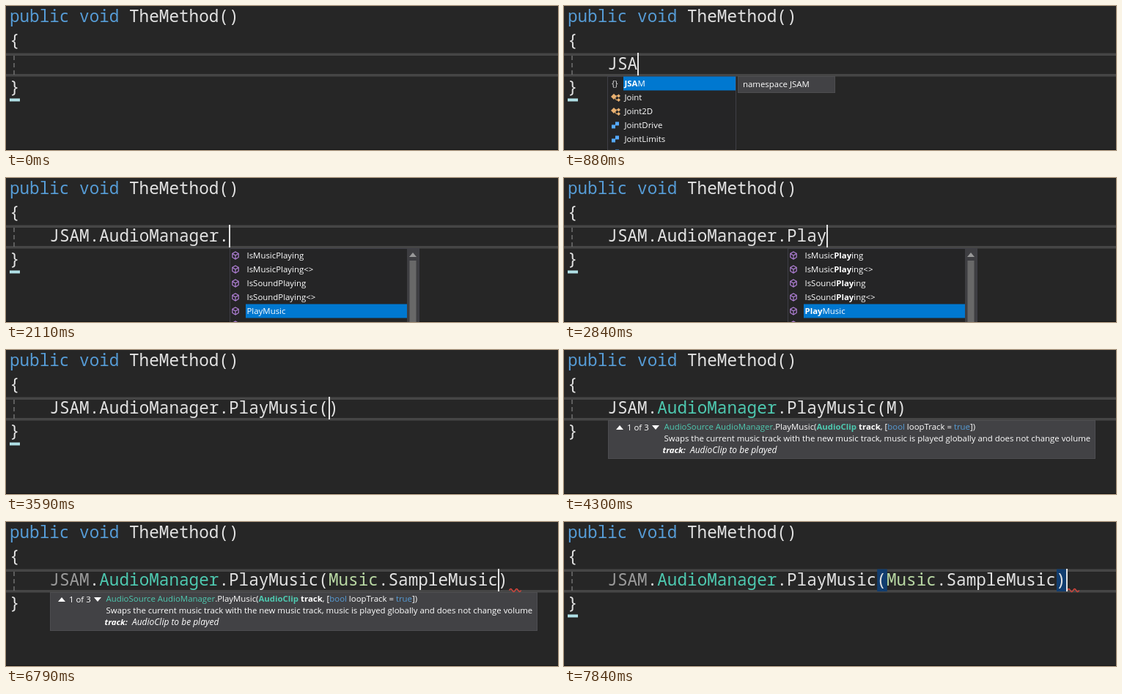
These frames come from a looping animation (753x197 px, 8000 ms). An HTML page:

```html
<!DOCTYPE html>
<html lang="en">
<head>
<meta charset="utf-8">
<title>Code completion</title>
<style>
html, body { margin: 0; width: 100%; height: 100%; overflow: hidden; background: #262626; }
svg { display: block; }
text { white-space: pre; }
.code { font: 500 22.67px "Noto Sans Mono", monospace; }
.ui { font: 11.42px "Open Sans", sans-serif; }
.b { font-weight: 700; }
.i { font-style: italic; }
.wide { font-size: 12px; }
</style>
</head>
<body>
<svg id="stage" width="753" height="197" viewBox="0 0 753 197"></svg>
<script>
const LOOP = 8000, CELL = 13.6, LEFT = 60;
const INK = '#e2e2e2', TEAL = '#4ec9b0', BLUE = '#569cd6', UI = '#ffffff';
const stage = document.getElementById('stage');

const col = n => LEFT + n * CELL;
const esc = s => s.replace(/</g, '&lt;').replace(/>/g, '&gt;');
const rect = (x, y, w, h, fill, more = '') =>
  `<rect x="${x}" y="${y}" width="${w}" height="${h}" fill="${fill}" ${more}/>`;
const path = (d, fill, more = '') => `<path d="${d}" fill="${fill}" ${more}/>`;
const span = (s, fill, cls = '') => `<tspan fill="${fill}" class="${cls}">${esc(s)}</tspan>`;
const text = (x, y, cls, body) => `<text x="${x}" y="${y}" class="${cls}" fill="${INK}">${body}</text>`;
const within = (t, a, b) => t >= a && t < b;

// Typed text: each entry holds from its time on
const typing = [[0, '']];
function type(base, extra, times) {
  times.forEach((at, i) => typing.push([at, base + extra.slice(0, i + 1)]));
}
const CALL = 'JSAM.AudioManager.';
type('', 'JSAM.Audio', [640, 760, 860, 960, 1100, 1240, 1340, 1410, 1470, 1580]);
typing.push([1740, 'JSAM.AudioManager'], [2000, CALL]);
type(CALL, 'PlayMusic(', [2380, 2500, 2690, 2840, 2990, 3210, 3270, 3330, 3390, 3550]);
type(CALL + 'PlayMusic(', 'Music.', [4300, 4510, 4610, 4720, 4840, 5020]);
const ARG = CALL + 'PlayMusic(Music.';
typing.push([5710, ARG + 'S'], [5860, ARG + 'SampleMusic'], [7680, ARG + 'SampleMusic)']);

const typedAt = t => typing.filter(e => e[0] <= t).pop()[1];

// The caret flips at each of these times, starting hidden
const flips = [400, 1240, 1320, 2990, 3550, 4140, 4450, 6270, 6760, 7280, 7680];
const caretOn = t => flips.filter(f => f <= t).length % 2 === 1;

// Completion lists: kind and label of each row
const lists = [
  { from: 660, to: 1100, x: 59, y: 96, w: 176, sel: 0, col: 0, note: 'namespace JSAM', noteEnd: 370,
    rows: ['n JSAM', 'c Joint', 'c Joint2D', 's JointDrive', 's JointLimits', 's JointMotor'] },
  { from: 1160, to: 1740, x: 127, y: 96, w: 204, sel: 4, col: 5, thumb: [136, 34],
    rows: ['c AudioFileMusicObject', 'c AudioFileObject', 's AudioHighPassObj', 's AudioLowPassObj',
      'c AudioManager', 'c AudioPlaylist'] },
  { from: 2080, to: 3060, x: 305, y: 96, w: 259, sel: 4, col: 18, thumb: [113, 90],
    rows: ['m IsMusicPlaying', 'm IsMusicPlaying<>', 'm IsSoundPlaying', 'm IsSoundPlaying<>',
      'm PlayMusic', 'm PlayMusic<>'] },
  { from: 3060, to: 3550, x: 305, y: 96, w: 259, sel: 0, col: 18, tray: 18,
    rows: ['m PlayMusic', 'm PlayMusic<>', 'm PlayMusicObject', 'm PlayMusicObject<>'] },
  { from: 4450, to: 5020, x: 439, y: 149, w: 170, sel: 0, col: 28, note: 'enum JSAM.Music', noteEnd: 760,
    rows: ['e Music', 'c MusicObject', 'c MusicPlayer'] },
  { from: 5150, to: 5860, x: 521, y: 149, w: 130, sel: 0, col: 34, rows: ['v SampleMusic'] }
];

function icon(kind, x, y) {
  const at = body => `<g transform="translate(${x} ${y})">${body}</g>`;
  if (kind === 'c') return at(
    path('M-6-1L-2-5L2-1L-2 3ZM2-2L4.500-4.500L7-2L4.500.500ZM2 3.500L4.500 1L7 3.500L4.500 6Z', '#e8b070') +
    path('M0-2H4M0 1L1 3.500H4', 'none', 'stroke="#e8b070"'));
  if (kind === 's') return at(rect(0, -4.5, 5, 5, '#55aaff') + rect(-5, -0.5, 5, 5, '#55aaff'));
  if (kind === 'm') return at(
    path('M0-5L4.200-2.700V2.500L0 5L-4.200 2.500V-2.700ZM-4-2.500L0 0L4-2.500M0 0V5', 'none',
      'stroke="#b180d7" stroke-width="1.2"'));
  if (kind === 'n') return at(text(-5, 4, 'ui', '{}'));
  return at(rect(-4.5, -3.5, 9, 7, kind === 'e' ? '#e8b070' : '#55aaff') + rect(-2.5, -0.5, 5, 1, '#252526'));
}

function label(s, query) {
  const at = query ? s.toLowerCase().indexOf(query.toLowerCase()) : -1;
  if (at < 0) return span(s, UI);
  const end = at + query.length;
  return span(s.slice(0, at), UI) + span(s.slice(at, end), UI, 'b') + span(s.slice(end), UI);
}

function popup(p, query) {
  const bar = p.thumb ? 17 : 1, right = p.x + p.w;
  const h = p.rows.length * 19 + 2 + (p.tray || 0);
  let out = rect(p.x + .5, p.y + .5, p.w - 1, h - 1, '#252526', 'stroke="#3f3f46"');
  p.rows.forEach((row, i) => {
    const mid = p.y + 10 + i * 19;
    if (i === p.sel) out += rect(p.x + 22, mid - 9.5, p.w - 22 - bar, 19, '#0078d0');
    out += icon(row[0], p.x + (row[0] === 'm' ? 8 : 11), mid) +
      text(p.x + 23.5, mid + 4, 'ui', label(row.slice(2), query));
  });
  if (p.thumb) {
    const mid = right - 9;
    out += rect(right - 17, p.y + 1, 16, h, '#3e3e42') +
      path(`M${mid - 5} ${p.y + 12}h10l-5-6z`, '#999') +
      rect(mid - 4.5, p.thumb[0], 9, p.thumb[1], '#686868');
  }
  if (p.tray) out += rect(p.x + 1, p.y + h - p.tray, p.w - 2, p.tray - 1, '#2d2d30') +
    icon('m', p.x + 12, p.y + h - p.tray / 2);
  if (p.note) out += rect(right + 2.5, p.y + .5, p.noteEnd - right - 3, 22, '#424245', 'stroke="#4d4d50"') +
    text(right + 9, p.y + 15, 'ui', span(p.note, UI));
  return out;
}

const signature = rect(60.5, 96.5, 664, 52, '#424245', 'stroke="#4d4d50"') +
  path('M71 109h10l-5-6zM120 103h10l-5 6z', UI) +
  text(86, 110, 'ui', span('1 of 3', UI)) +
  text(136.5, 109, 'ui', span('AudioSource AudioManager', TEAL) + span('.PlayMusic(', UI) +
    span('AudioClip', TEAL, 'b') + span(' track', UI, 'b') + span(', [', UI) + span('bool', BLUE) +
    span(' loopTrack = ', UI) + span('true', BLUE) + span('])', UI)) +
  text(136.5, 125, 'ui', span('Swaps the current music track with the new music track, ' +
    'music is played globally and does not change volume', UI)) +
  text(134.5, 141, 'ui i', span('track:', UI, 'b') + span('  AudioClip to be played', UI, 'wide'));

function squiggle(x, end) {
  let d = `M${x} 93.500`;
  for (let i = 0; x + i * 4 < end - 2; i++) d += `q2 ${i % 2 ? 4 : -4} 4 0`;
  return path(d, 'none', 'stroke="#d8453c" stroke-width="1.5"');
}

function code(t, line) {
  const tint = { JSAM: [4600, '#9b9b9b'], AudioManager: [3960, TEAL], Music: [5370, '#b8d7a3'] };
  return line.match(/\w+|\W/g).map(w => {
    const c = tint[w];
    return span(w, c && t >= c[0] ? c[1] : INK);
  }).join('');
}

function scene(t) {
  const typed = typedAt(t), caret = col(typed.length);
  const line = typed + (within(t, 3550, 7680) ? ')' : '');
  let out = rect(0, 0, 753, 197, '#262626') + rect(0, 196, 753, 1, '#161616') +
    rect(0, 64.5, 753, 3.5, '#464646') + rect(0, 93, 753, 3.5, '#464646') +
    path('M11 68V97', 'none', 'stroke="#707070" stroke-width="1.500" stroke-dasharray="6 4"');

  if (within(t, 7530, 7680)) out += rect(col(34), 64, 11 * CELL, 31, '#113d6f');
  if (t >= 7840) out += [27, 45].map(n => rect(col(n), 64.5, CELL, 30.5, '#113d6f')).join('');

  out += text(4.9, 22, 'code', span('public void', BLUE) + span(' TheMethod()', INK)) +
    text(4.9, 54.5, 'code', '{') + text(4.9, 118.5, 'code', '}');
  if (t < 3710 || t >= 7840) out += rect(5, 126.5, 14, 4, '#b0e0e6');
  if (line) out += text(LEFT - .7, 87, 'code', code(t, line));

  if (within(t, 5020, 6020)) out += squiggle(col(18), col(27));
  if (t >= 4780 && !within(t, 6760, 6790)) {
    const end = col(line.length);
    out += squiggle(end + 1, end + 19);
  }
  if (caretOn(t)) out += rect(Math.round(caret) - 1, 64, 2, 31, INK);
  if (within(t, 3710, 7680)) out += signature;
  for (const p of lists)
    if (within(t, p.from, p.to)) out += popup(p, typed.slice(p.col));
  return out;
}

let shown = '';
function tick(now) {
  const next = scene(now % LOOP);
  if (next !== shown) stage.innerHTML = shown = next;
  requestAnimationFrame(tick);
}
tick(0);
</script>
</body>
</html>
```
